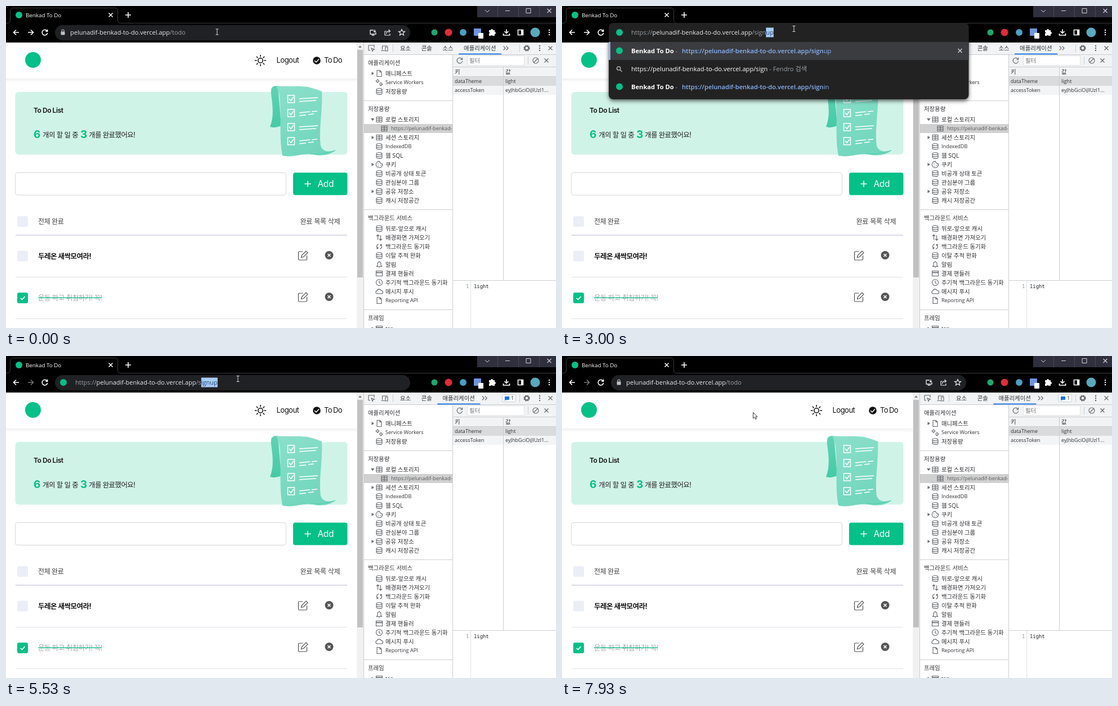
Animation of 977 by 573 pixels, one loop 8000 ms. Source, as an HTML page:

```html
<!DOCTYPE html>
<html lang="ko">
<head>
<meta charset="utf-8">
<title>To Do</title>
<style>
html, body { margin: 0; width: 100%; height: 100%; overflow: hidden; background: #fff; }
svg { display: block; width: 977px; height: 573px; }
text { white-space: pre; }
.ui { font-family: 'Open Sans', 'Noto Sans CJK KR', sans-serif; }
.page { font-family: Inter, 'Noto Sans CJK KR', sans-serif; }
.mono { font-family: 'Noto Sans Mono', 'DejaVu Sans Mono', monospace; }
</style>
</head>
<body>
<svg id="stage" viewBox="0 0 977 573" xmlns="http://www.w3.org/2000/svg"></svg>
<script>
const LOOP = 8000;
const HOST = 'pelunadif-benkad-to-do.vercel.app';
const APP = 'Benkad To Do';
const GREEN = '#05c087', GREY = '#9aa0a6', LIGHT = '#e8eaed', BLUE = '#8ab4f8', ICON = '#5f6368', RULE = '#cacdd1';

const rect = (x, y, w, h, fill, more = '') =>
  `<rect x="${x}" y="${y}" width="${w}" height="${h}" fill="${fill}" ${more}/>`;
const dot = (x, y, r, fill, more = '') => `<circle cx="${x}" cy="${y}" r="${r}" fill="${fill}" ${more}/>`;
const shape = (d, fill) => `<path d="${d}" fill="${fill}"/>`;
const path = (d, stroke, width = 1, more = '') =>
  `<path d="${d}" fill="none" stroke="${stroke}" stroke-width="${width}" ${more}/>`;
const span = (s, fill, more = '') => `<tspan fill="${fill}" ${more}>${s}</tspan>`;
const text = (x, y, s, size, fill, more = 'class="ui"') =>
  `<text x="${x}" y="${y}" font-size="${size}" fill="${fill}" ${more}>${s}</text>`;
const pageText = (x, y, s, size, fill, weight, spacing, more = '') =>
  text(x, y, s, size, fill, `class="page" font-weight="${weight}" letter-spacing="${spacing}" ${more}`);

// Icon outlines centred on the origin.
const ICONS = {
  file: 'M-4 -5.5H1L4 -2.5V5.5H-4ZM1 -5.5V-2.5H4',
  db: 'M-5 -3.2a5 2 0 0 1 10 0V3.4a5 2 0 0 1-10 0ZM-5 -3.2a5 2 0 0 0 10 0M-5 .2a5 2 0 0 0 10 0',
  grid: 'M-5 -4.5H5V4.5H-5ZM-5 -1.5H5M-5 1.5H5M0 -4.5V4.5',
  gears: 'M-5 -2.5a2 2 0 1 0 4 0a2 2 0 1 0-4 0M1 3a2 2 0 1 0 4 0a2 2 0 1 0-4 0M-3 -6V-4.5M-3 -.5V1M-6.5 -2.5H-5M-1 -2.5H.5M3 -.5V1M3 5V6.5M5 3H6.5',
  cookie: 'M1 -5.5A5.7 5.7 0 1 0 5.5 -1C3.5 -.5 3 -2 3 -2.5C1 -2.5 .5 -4 1 -5.5M-3 -1h1.5M-2 3h1.5M1.5 1.5H3',
  swap: 'M-2.5 4V-5M-5 -2.5L-2.5 -5L0 -2.5M2.5 -4V5M0 2.5L2.5 5L5 2.5',
  sync: 'M-1 -4.2A4.2 4.2 0 0 0-2.5 3.5M-5 3.8H-2.3V1M1 4.2A4.2 4.2 0 0 0 2.5 -3.5M5 -3.8H2.3V-1',
  bell: 'M-4.5 3.5H4.5L3 2V-1.5a3 3 0 0 0-6 0V2ZM0 -4.5V-6M-1 5.3H1',
  card: 'M-5.5 -4.5H5.5V4.5H-5.5ZM-5.5 -2H5.5M-5.5 -1.2H5.5',
  clock: 'M-5.5 0a5.5 5.5 0 1 0 11 0a5.5 5.5 0 1 0-11 0M0 -3.5V.5L2.5 2',
  cloud: 'M-3.5 4a2.8 2.8 0 0 1-.5-5.5a4 4 0 0 1 7.5 0a2.7 2.7 0 0 1 .5 5.5Z',
  close: 'M-3.5 -3.5L3.5 3.5M3.5 -3.5L-3.5 3.5',
  smallClose: 'M-2.5 -2.5L2.5 2.5M2.5 -2.5L-2.5 2.5',
  reload: 'M4 -2.5A4.8 4.8 0 1 0 4.7 1M4.6 -5.2V-1.8H1.2',
  left: 'M5 0H-4.5M0 -4.5L-4.5 0L0 4.5',
  right: 'M-5 0H4.5M0 -4.5L4.5 0L0 4.5',
  plus: 'M-5 0H5M0 -5V5',
  install: 'M1 -4H-5V3H5V0M-2.5 5H2.5M3 -5V-.5M1 -2.3L3 -.3L5 -2.3',
  share: 'M-2 -2H-5V5H4V2M-2.5 2.5C-2 -1 0 -2.3 3 -2.3M1.5 -5L4.5 -2.3L1.5 .4',
  star: 'M0 -5.5L1.6 -1.8L5.5 -1.5L2.5 1L3.5 5L0 2.8L-3.5 5L-2.5 1L-5.5 -1.5L-1.6 -1.8Z',
  download: 'M0 -5.5V1.5M-3.5 -2L0 1.5L3.5 -2M-5.5 2V5H5.5V2',
  search: 'M-4.5 -1a3.2 3.2 0 1 0 6.4 0a3.2 3.2 0 1 0-6.4 0M1 1.4L4.5 5',
  info: 'M-4.8 0a4.8 4.8 0 1 0 9.6 0a4.8 4.8 0 1 0-9.6 0M0 -2.7V-1.5M0 -.5V2.7',
  inspect: 'M-5 4V-5H5V-1M-5 4H-2M0 0L5.5 2L3 3L2 5.5Z',
  device: 'M-3.5 3V-4H6M-5.5 4.5H1M2 -2H6V5H2Z',
  more: 'M-4.5 -3.5L-1 0L-4.5 3.5M.5 -3.5L4 0L.5 3.5',
  block: 'M-5 0a5 5 0 1 0 10 0a5 5 0 1 0-10 0M-3.5 3.5L3.5 -3.5',
  edit: 'M0 -7H-6.5Q-8 -7-8 -5.5V6.5Q-8 8-6.5 8H5.5Q7 8 7 6.5V0M-3 3.5L-2 -.5L5.5 -8L8.5 -5L1 2.5Z',
  check: 'M-3.8 .2L-1 3L4 -2.5'
};
const icon = (name, x, y, color = ICON, width = 1.1, more = '') =>
  path(ICONS[name], color, width, `transform="translate(${x} ${y})" ${more}`);
const menuDots = (x, y, color) => [-4, 0, 4].map(d => dot(x, y + d, 1.2, color)).join('');

function chrome() {
  return rect(0, 0, 977, 65, '#000')
    + path('M0 30.5H2Q7.5 30.5 7.5 25V9Q7.5 3.5 13 3.5H193Q198.5 3.5 198.5 9V25Q198.5 30.5 204 30.5H977', '#3b3c3f')
    + text(35, 20, APP, 9.8, '#fff') + icon('close', 186, 16, '#fff', 1.5)
    + icon('plus', 217, 16, '#fff', 1.6)
    + rect(837, 0, 140, 20, '#302f3d')
    + [873, 910, 947].map(x => rect(x, 0, 1, 20, '#4a4957')).join('')
    + path('M851 7l4 4l4-4M887 8.5h8M924 4.5h8v8h-8Z', '#d4d4da')
    + icon('close', 965, 8.5, '#d4d4da', 1.1)
    + icon('left', 18, 47, '#fff', 1.6)
    + dot(761, 47, 5.5, '#1fa66f') + dot(786, 47, 6.5, '#e12d39') + dot(812, 47, 6, '#4b9fc4')
    + rect(831, 40, 13, 13, '#6f95dc', 'rx="1"') + rect(839, 48, 9, 10, '#fff', 'rx="1"')
    + shape('M858 43h3a2 2 0 0 1 4 0h3v3a2 2 0 0 1 0 4v3h-3.5a2 2 0 0 0-3.5 0h-3v-3.5a2 2 0 0 0 0-3.5Z', '#fff')
    + icon('download', 889, 47, '#fff', 1.7)
    + path('M909.5 42.5h9v9h-9Z', '#fff', 1.6) + rect(915, 42, 4, 10, '#fff')
    + dot(940, 47, 8.5, '#58a9bd') + menuDots(965, 47, '#fff');
}

function paperRoll() {
  const row = (y, i) => path(`M500.5 ${y}h12v13h-12Z`, '#fff', 1.4)
    + path(`M503 ${y + 6}l3 3.5l5-6.5`, '#fff', 1.5)
    + path(i % 2 ? `M521 ${y + 6}l19-2M543 ${y + 4}l10-1M521 ${y + 11}l12-1M537 ${y + 9}l10-1`
      : `M521 ${y + 6}l33-2M521 ${y + 11}l30-2`, '#fff', 1.7);
  return shape('M483 142C472 141 470 146 471 157C474 180 476 197 469 215Q478 218 489 213Z', 'url(#curl)')
    + shape('M479 142C500 144 525 141 540 145Q552 148 561 152C563 185 555 220 559 249Q564 263 585 257C576 265 559 268 545 264C525 261 510 271 491 266C485 237 489 200 487 177Q487 151 479 142Z', 'url(#roll)')
    + path('M541 263Q560 265 585 257', '#4fccab', 1.2)
    + [159, 184, 209, 234].map(row).join('');
}

function itemTools(y) {
  return icon('edit', 527.5, y, '#505050', 1.2) + dot(574, y - .5, 7.5, '#555') + icon('smallClose', 574, y - .5, '#fff', 1.6);
}

function page() {
  const rays = Array.from({ length: 8 }, (_, i) => {
    const a = i * Math.PI / 4, c = Math.cos(a), s = Math.sin(a);
    return `M${452 + 7 * c} ${97 + 7 * s}L${452 + 9.5 * c} ${97 + 9.5 * s}`;
  }).join('');
  const box = y => rect(20, y, 19, 19, '#ebeef7', 'rx="3"');
  const rule = (y, c, h) => rect(17, y, 589, h, c);
  return rect(0, 65, 623, 508, '#fff')
    + '<g id="content">' + rect(0, 129, 623, 7, 'url(#headShade)')
    + dot(48, 96, 14, GREEN)
    + dot(452, 97, 4.2, 'none', 'stroke="#111" stroke-width="1.6"') + path(rays, '#111', 1.6, 'stroke-linecap="round"')
    + pageText(480.5, 101, 'Logout', 13, '#111', 400, -.5)
    + dot(552, 97, 6.8, '#111') + icon('check', 552, 97, '#fff', 1.5)
    + pageText(565, 101, 'To Do', 13, '#111', 400, -.6, 'word-spacing="-1"')
    + rect(16.5, 153, 590, 111.5, '#d0f3e7', 'rx="6"') + paperRoll()
    + pageText(49, 190, 'To Do List', 12, '#111', 600, -.45)
    + pageText(49, 235, '6', 19, GREEN, 700, 0, 'id="total"') + pageText(65, 234, '개의 할 일 중', 12.5, '#222', 400, -.6)
    + pageText(132, 235, '3', 19, GREEN, 700, 0, 'id="done"') + pageText(147, 234, '개를 완료했어요!', 12.5, '#222', 400, -.6)
    + rect(16.5, 296.5, 481, 40, '#fff', 'rx="4" stroke="#d5d6da"')
    + rect(510, 296.5, 96.5, 40, GREEN, 'rx="4"') + icon('plus', 536, 316.5, '#fff', 1.5, 'stroke-linecap="round"')
    + pageText(553.5, 322, 'Add', 15.5, '#fff', 400, -.4)
    + box(374) + pageText(57, 388, '전체 완료', 12, '#444', 500, -.4)
    + pageText(593.5, 388, '완료 목록 삭제', 12, '#444', 500, -.2, 'text-anchor="end"')
    + rule(407, '#cfd0e0', 1.5)
    + '<g id="items">' + box(435.5) + pageText(57, 449.5, '두레온 새싹모여라!', 12.5, '#111', 700, -.5)
    + itemTools(444) + rule(482, '#dfe0e8', 1)
    + rect(20, 510, 19, 19, GREEN, 'rx="3"') + icon('check', 29.5, 519.5, '#fff', 1.6)
    + pageText(57, 523.5, '운동 하고 취침하기! 꼭!', 12.5, '#a3a6a8', 400, -.55)
    + rect(57, 518.5, 112, 1.3, GREEN) + itemTools(518) + rule(556, '#dfe0e8', 1) + '</g></g>';
}

function scrollbar() {
  return rect(623, 65, 12, 508, '#f1f1f1') + rect(624, 78, 10, 405, '#c1c1c1')
    + shape('M626 74L629 70.5L632 74Z', '#777') + rect(635, 65, 1, 508, RULE);
}

const label = (x, mid, s, fill = '#303135') => {
  const korean = /[가-힣]/.test(s);
  return text(x, mid + (korean ? 4 : 3.4), s, korean ? 10.4 : 9.1, fill);
};

const TREE = [
  [101, '애플리케이션', [
    ['file', '매니페스트', '>'], ['gears', 'Service Workers'], ['db', '저장용량']]],
  [183, '저장용량', [
    ['grid', '로컬 스토리지', 'v'], ['grid', 'https://' + HOST.slice(0, 17), '*'], ['grid', '세션 스토리지', '>'],
    ['db', 'IndexedDB'], ['db', '웹 SQL'], ['cookie', '쿠키', '>'], ['db', '비공개 상태 토큰'],
    ['db', '관심분야 그룹'], ['db', '공유 저장소', '>'], ['db', '캐시 저장공간']]],
  [377, '백그라운드 서비스', [
    ['db', '뒤로-앞으로 캐시'], ['swap', '배경화면 가져오기'], ['sync', '백그라운드 동기화'],
    ['db', '이탈 추적 완화'], ['bell', '알림'], ['card', '결제 핸들러'], ['clock', '주기적 백그라운드 동기화'],
    ['cloud', '메시지 푸시'], ['file', 'Reporting API']]],
  [555, '프레임', [['card', 'top', '>']]]
];

function treeItem([name, s, mark], y) {
  const picked = mark === '*', x = picked ? 672 : 663;
  const arrow = mark === '>' ? `M649.5 ${y - 3}l4.5 3l-4.5 3Z` : mark === 'v' ? `M648 ${y - 2}h6.5l-3.2 4.5Z` : '';
  return (picked ? rect(636, y - 8, 157, 16, '#d0d0d0') : '') + shape(arrow, '#6e6e6e')
    + icon(name, x, y) + label(x + (picked ? 12 : 11), y, s, picked ? '#55585c' : '#303135');
}

function tree() {
  return TREE.map(([top, title, items], i) => (i ? rect(636, top - 15, 157, 1, RULE) : '')
    + label(643, top, title)
    + items.map((item, k) => treeItem(item, top + 19 + 16 * k)).join('')).join('');
}

function devtools() {
  return rect(636, 65, 341, 508, '#fff') + rect(636, 65, 341, 21, '#f1f3f4') + rect(636, 86, 341, 1, RULE)
    + icon('inspect', 649, 75) + icon('device', 672, 75) + rect(687, 69, 1, 13, RULE)
    + '<g id="tabs"></g>'
    + rect(912, 69, 1, 13, RULE)
    + dot(925, 75, 4.6, 'none', `stroke="${ICON}" stroke-width="2" stroke-dasharray="2.5 1.11"`)
    + dot(925, 75, 3.2, 'none', `stroke="${ICON}" stroke-width="1.5"`)
    + menuDots(948, 75, ICON) + icon('close', 967, 75)
    + '<svg x="0" y="0" width="793" height="573" style="width:793px">' + tree() + '</svg>'
    + rect(794, 87, 183, 39, '#f1f3f4') + rect(793, 87, 1, 486, RULE)
    + icon('reload', 806, 97) + rect(819.5, 88.5, 101, 17, '#fff', 'stroke="#dfe1e5"') + label(823, 97, '필터', '#757575')
    + rect(927, 90, 1, 14, RULE) + icon('block', 941, 97) + icon('close', 960, 97)
    + rect(794, 108, 183, 1, RULE) + label(797, 117, '키') + label(887, 117, '값') + rect(794, 125, 183, 1, RULE)
    + rect(794, 126, 183, 16, '#dadbdd') + rect(794, 142, 183, 16, '#f3f4f6')
    + label(797, 134, 'dataTheme') + label(887, 134, 'light') + label(797, 150, 'accessToken') + label(887, 150, 'eyJhbGciOiJIUzI1...')
    + rect(883, 109, 1, 380, RULE) + rect(794, 488, 183, 1, RULE)
    + rect(825, 489, 1, 84, '#e1e3e6')
    + text(817, 501.5, '1', 9, '#8a8d91', 'class="mono"') + text(831, 501.5, 'light', 8.9, '#202124', 'class="mono"');
}

function tabs(flag) {
  const names = flag ? ['요소', '콘솔', '애플리케이션'] : ['요소', '콘솔', '소스', '애플리케이션'];
  const last = 700 + 37.7 * (names.length - 1);
  return names.map((s, i) => label(700 + 37.7 * i, 75, s)).join('')
    + rect(last - 9, 84.5, 76, 1.8, '#1a73e8') + icon('more', last + 75, 75)
    + (flag ? rect(881.5, 68.5, 24, 13, '#fff', `rx="2" stroke="${RULE}"`)
      + shape('M886 72h8v6h-6l-2 2Z', '#1a73e8') + label(897, 75, '1') : '');
}

// Dropdown rows: site entries carry a path, the search entry echoes the typed address.
const site = p => ({ path: p });
const SEARCH = { search: true };
const LISTS = {
  root: [site(''), SEARCH, site('todo'), site('signup'), site('signin'), site('login')],
  s: [site('signup'), SEARCH, site('signin'), site('todo'), site('')],
  sign: [site('signup'), SEARCH, site('signin')],
  signin: [site('signin'), SEARCH]
};

function dropdown(list, typed) {
  const rows = LISTS[list], size = 11.15;
  const row = (r, i) => {
    const mid = 79.5 + 32 * i, y = mid + 4;
    if (r.search) return icon('search', 102, mid + .5, '#bdc1c6', 1.3)
      + text(123, y, span(`https://${HOST}/${typed}`, '#fff') + span(' - Fendro 검색', GREY), size, '#fff');
    const hit = r.path.startsWith(typed) ? typed : '';
    return dot(102, mid, 6, GREEN)
      + text(123, y, span(APP, '#fff', 'font-weight="700"') + span(' - ', GREY)
        + span(`https://${HOST}/${hit}`, BLUE, 'font-weight="600" x="213"') + span(r.path.slice(hit.length), BLUE), size, '#fff');
  };
  return rect(83, 30, 639.5, 40 + 32 * rows.length, '#202124', 'rx="8" filter="url(#drop)"')
    + rect(83, 64, 639.5, 32, '#3b3c3f') + rect(83, 64, 3, 32, BLUE)
    + icon('close', 707, 79.5, '#d4d6d9', 1.3) + rows.map(row).join('');
}

function omnibox(s) {
  const bar = s.list ? dropdown(s.list, s.typed) : rect(87, 34, 631, 27, '#202124', 'rx="13.5"');
  if (!s.edit) return bar
    + (s.busy ? icon('info', 101, 47, '#bdc1c6')
      : rect(97.5, 45.5, 7, 6, '#bdc1c6', 'rx="1"') + path('M99 46V44a2 2 0 0 1 4 0v2', '#bdc1c6', 1.2))
    + text(114, 51, span(HOST, LIGHT) + span('/' + s.path, GREY), 11, LIGHT)
    + icon('install', 652, 47, LIGHT, 1.3) + icon('share', 678, 47, LIGHT, 1.2) + icon('star', 703, 47, LIGHT, 1.2);
  const ink = c => s.all ? '#111' : c;
  return bar + (s.typed + s.tail ? dot(102, 47, 6, GREEN) : dot(102, 47, 5.5, '#4b9fc4'))
    + '<rect id="pick" y="38.5" height="17" fill="#a8cdfa"/>'
    + text(123, 51, span('https://', ink(GREY)) + span(HOST, ink(LIGHT)) + span('/' + s.typed, ink(GREY))
      + span(s.tail, '#23456f'), 11, LIGHT, 'class="ui" id="address"');
}

// Highlights the selected end of the address, or shows a caret there.
function placeSelection(s) {
  const address = $('address'), pick = $('pick'), selected = s.all || s.tail;
  const head = s.all ? 0 : `https://${HOST}/${s.typed}`.length;
  const from = 123 + (head ? address.getSubStringLength(0, head) : 0);
  pick.setAttribute('x', from);
  pick.setAttribute('width', selected ? 123 + address.getComputedTextLength() - from : 1);
  if (!selected) pick.setAttribute('fill', LIGHT);
}

const start = { edit: false, busy: false, path: 'todo', typed: '', tail: '', all: false, list: '',
  icon: true, forward: true, flag: false, view: 2 };
const focus = t => [[t, { edit: true, tail: 'todo', typed: '', all: true }], [t + 130, { all: false }]];
const load = (t, p) => [
  [t, { edit: false, busy: true, path: p, icon: false, forward: false }],
  [t + 70, { list: '' }],
  [t + 130, { view: 0 }],
  [t + 270, { view: 1, path: 'todo', flag: true }],
  [t + 400, { view: 2, icon: true }],
  [t + 530, { busy: false }]
];
const STEPS = [
  ...focus(1200),
  [2270, { tail: '' }], [2330, { list: 'root' }],
  [2730, { typed: 's', tail: 'ignup', list: 'sign' }], [2800, { typed: 'si', tail: 'gnup' }],
  [2930, { typed: 'sig', tail: 'nup' }], [3000, { typed: 'sign', tail: 'up' }],
  ...load(3400, 'signup'),
  ...focus(4530),
  [5530, { typed: 's', tail: 'ignup' }], [5600, { list: 's' }],
  [5670, { typed: 'si', tail: 'gnup', list: 'sign' }], [5800, { typed: 'sig', tail: 'nup' }],
  [5870, { typed: 'sign', tail: 'up' }],
  [6270, { typed: 'signi', tail: 'n', list: 'signin' }], [6400, { typed: 'signin', tail: '' }],
  ...load(6600, 'signin')
];
const POINTER = [[0, 375, 46], [1730, 388, 39], [1800, 403, 37], [1870, 411, 40], [2070, 412, 40.5],
  [7870, 372, 78], [7930, 339.5, 100.5]];

const $ = id => document.getElementById(id);
const gradient = (id, x2, y2, a, b) =>
  `<linearGradient id="${id}" x2="${x2}" y2="${y2}"><stop stop-color="${a}"/><stop offset="1" stop-color="${b}"/></linearGradient>`;

$('stage').innerHTML = '<defs>' + gradient('headShade', 0, 1, '#f1f1f2', '#ffffff')
  + gradient('roll', .4, 1, '#8ce0cb', '#72d6bd') + gradient('curl', 0, 1, '#5fd3b4', '#45caa6')
  + '<filter id="drop" x="-5%" y="-10%" width="110%" height="125%"><feDropShadow dx="0" dy="3" stdDeviation="3.5" flood-opacity=".6"/></filter></defs>'
  + chrome() + page() + scrollbar() + devtools() + '<g id="nav"></g><g id="box"></g><g id="pointer"></g>';

function drawState(s) {
  $('nav').innerHTML = (s.icon ? dot(23, 16, 6, GREEN) : '')
    + icon('right', 44, 47, s.forward ? '#fff' : '#707378', 1.6)
    + icon(s.busy ? 'close' : 'reload', 69, 47, '#fff', 1.6);
  $('box').innerHTML = omnibox(s);
  if (s.edit) placeSelection(s);
  $('tabs').innerHTML = tabs(s.flag);
  const ready = s.view === 2;
  $('content').style.display = s.view ? '' : 'none';
  $('items').style.display = ready ? '' : 'none';
  $('total').textContent = ready ? 6 : 0;
  $('done').textContent = ready ? 3 : 0;
}

function drawPointer([, x, y]) {
  $('pointer').innerHTML = y > 65
    ? `<path d="M${x} ${y}v10.5l2.5-2.3l1.7 3.8l1.8-.8l-1.7-3.7h3.3Z" fill="#fff" stroke="#222" stroke-width=".9"/>`
    : path(`M${x - 2.5} ${y - 5}h5M${x} ${y - 5}v10M${x - 2.5} ${y + 5}h5`, '#dcdcdc', 1);
}

let shown = '';
function render(t) {
  const past = STEPS.filter(step => step[0] <= t);
  const spot = POINTER.filter(p => p[0] <= t).pop();
  const key = past.length + ':' + spot[0];
  if (key === shown) return;
  shown = key;
  drawState(Object.assign({}, start, ...past.map(step => step[1])));
  drawPointer(spot);
}

const began = performance.now();
function tick() {
  render((performance.now() - began) % LOOP);
  requestAnimationFrame(tick);
}
tick();
</script>
</body>
</html>
```
